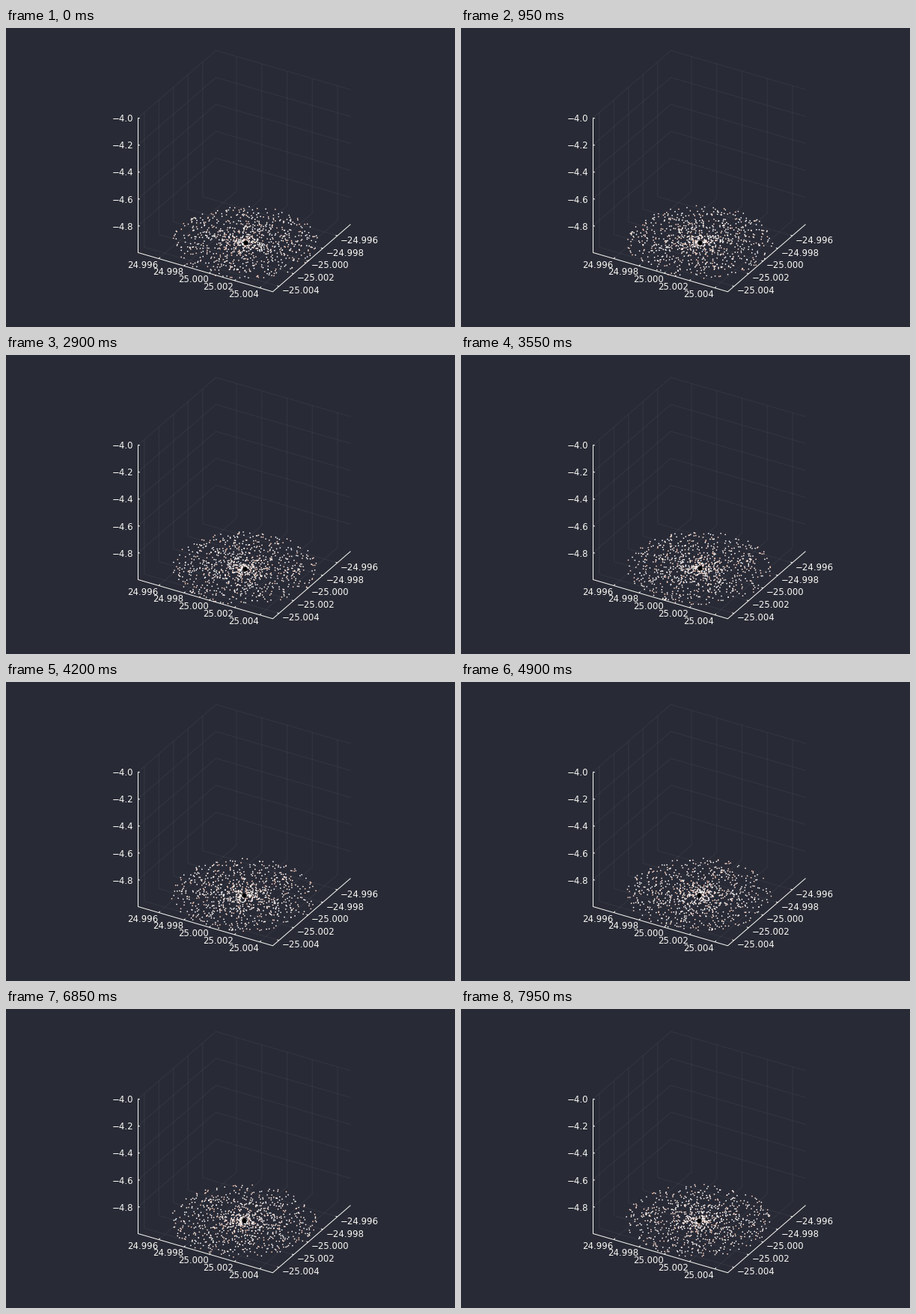
Recreate the animation shown at these times as a matplotlib script. Size 600 px wide and 400 px high, loop 8 s.

```python
import numpy as np
import matplotlib.pyplot as plt
from matplotlib.animation import FuncAnimation

W, H, DPI = 600, 400, 100
FRAMES, STEP = 160, 50
BACK, FORE = "#282a36", "#f8f8f2"
PX = 72 / DPI

# Oblique box: screen vectors of the three unit axes
ORIGIN = np.array([176.5, 300.5])
EX, EY, EZ = np.array([180.0, 52.3]), np.array([104.0, -90.2]), np.array([0.0, -180.2])

plt.rcParams["font.family"] = "DejaVu Sans"
fig = plt.figure(figsize=(W / DPI, H / DPI), dpi=DPI, facecolor=BACK)
ax = fig.add_axes([0, 0, 1, 1])
ax.set_xlim(0, W)
ax.set_ylim(H, 0)
ax.axis("off")


def project(x, y, z=0.0):
    return ORIGIN + x * EX + y * EY + z * EZ


def line(points, **style):
    p = np.array(points)
    ax.plot(p[:, 0], p[:, 1], lw=PX, solid_capstyle="butt", **style)


def grid(*corners):
    line([project(*c) for c in corners], color=FORE, alpha=0.055, zorder=1)


def axis(*points):
    line(points, color=FORE, zorder=2)


def tick(p, direction):
    axis(p, p + 2.5 * direction / np.hypot(*direction))


def label(p, text, align):
    ax.text(p[0], p[1], text.replace("-", "\u2212"), color=FORE, size=11.7 * PX,
            ha=align, va="center_baseline", zorder=3)


for k in range(5):
    u, v, w = 0.153 + 0.1875 * k, 0.08 + 0.1875 * k, 1 - 0.2 * k
    grid((u, 0, 0), (u, 1, 0), (u, 1, 1))
    grid((1, v, 0), (0, v, 0), (0, v, 1))
    grid((0, 0, w), (0, 1, w), (1, 1, w))

    px, py, pz = project(u, 0), project(1, v), project(0, 0, w)
    tick(px, EY)
    tick(py, -EX)
    tick(pz, EX)
    label(px + (-1, 7.1), f"{24.996 + 0.002 * k:.3f}", "right")
    label(py + (4.2, 4.7), f"{-25.004 + 0.002 * k:.3f}", "left")
    label(pz + (-6.5, 0.1), f"{-4 - 0.2 * k:.1f}", "right")

axis(project(0, 0, 1), project(0, 0), project(1, 0), project(1, 1))

# Disc of stars, uniform in radius so it thickens toward the core
rng = np.random.default_rng(25)
COUNT = 900
radius = 0.469 * rng.uniform(0.02, 1, COUNT)
phase = rng.uniform(0, 2 * np.pi, COUNT)
speed = 0.5 * (0.469 / radius) ** 0.5
tints = np.array(["#ffffff", "#fff4ec", "#ffe6dc", "#ffd2be"])
colors = tints[rng.choice(4, COUNT, p=[0.35, 0.25, 0.25, 0.15])]

stars = ax.scatter(np.zeros(COUNT), np.zeros(COUNT), s=(1.7 * PX) ** 2,
                   c=colors, linewidths=0, zorder=4)
core, = ax.plot([], [], "o", ms=6.5 * PX, color="black", mew=0, zorder=5)

START, DRIFT = np.array([319.5, 287.1]), np.array([-2.0, -4.2])


def draw(i):
    center = START + DRIFT * i / (FRAMES - 1)
    angle = phase + speed * i * STEP / 1000
    x, y = radius * np.cos(angle), radius * np.sin(angle)
    stars.set_offsets(center + np.outer(x, EX) + np.outer(y, EY))
    core.set_data([center[0]], [center[1]])
    return stars, core


anim = FuncAnimation(fig, draw, frames=FRAMES, interval=STEP, repeat=True,
                     repeat_delay=0, blit=False)
plt.show()
```
